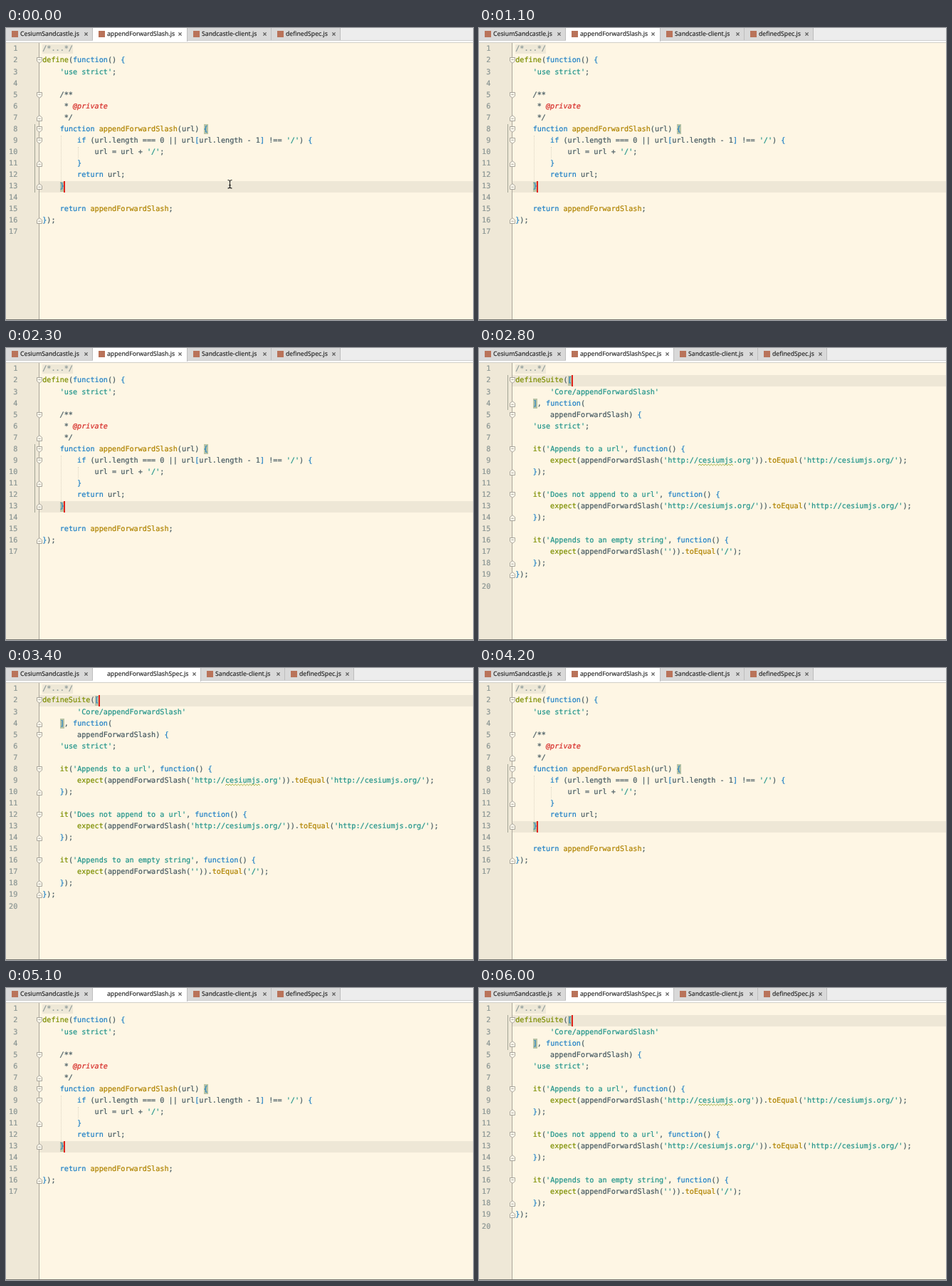
An HTML page for the animation above (6600 ms loop, 656 by 410 pixels).

```html
<!DOCTYPE html>
<html lang="en">
<head>
<meta charset="utf-8">
<title>Switching between code and spec</title>
<style>
  html, body { margin: 0; width: 100%; height: 100%; overflow: hidden; }
  body { background: #fef6e4; text-rendering: geometricPrecision; }
  #stage { position: relative; width: 656px; height: 410px; overflow: hidden; }
  #stage div, #stage i, #stage svg { position: absolute; }
  .view { inset: 0; background: #fef6e4; }

  .bar { left: 0; top: 0; width: 656px; height: 17px; background: #ededed; border-bottom: 1px solid #cfcfcf; }
  .strip { left: 0; top: 18px; width: 656px; height: 2px; background: #fdfdfd; border-bottom: 1px solid #d3d0c8; }
  .tab { top: 0; height: 17px; box-sizing: border-box; border-right: 1px solid #bdbdbd; background: #d9d9d9;
         font: 8.7px/17px "Noto Sans", "Open Sans", sans-serif; color: #1c1c1c; white-space: pre;
         -webkit-text-stroke: .12px; }
  .tab.on { background: #fff; height: 19px; }
  .tab span { position: absolute; left: 20px; top: 0; }
  .icon { left: 8px; top: 4px; width: 9px; height: 9px; background: #b9735a; }
  .tab svg { top: 6px; width: 5px; height: 5px; stroke: #555; stroke-width: 1.2; }

  .gutter { left: 0; top: 21px; width: 46px; height: 389px; background: #efe8d7; border-right: 1px solid #aaa69b; }
  .current { left: 47px; width: 609px; height: 16px; background: #eee7d6; }
  .row, .num { height: 16.06px; font: 10.16px/16.06px "DejaVu Sans Mono", monospace; white-space: pre;
               -webkit-text-stroke: .22px; }
  .row { left: 51.2px; color: #485c63; }
  .num { left: 0; width: 16.3px; text-align: right; color: #8b9694; }
  .match { width: 6.1px; height: 14px; background: #b9c4a6; }
  .fold { left: 51px; width: 43px; height: 13px; background: #eee8d7; }
  .caret { width: 1.8px; height: 16px; background: #e0241c; }
  .scope { left: 40px; width: 1px; background: #a3a496; }
  .guide { width: 0; border-left: 1px dotted #ddd6c4; }
  .mark { left: 43px; width: 8px; height: 9px; fill: #fdf8ec; stroke: #a09e95; stroke-width: .9; }
  .wave { fill: none; stroke: #9aa82c; stroke-width: .9; }
  .base { left: 0; top: 409px; width: 656px; height: 1px; background: #77756f; }

  .kw, .br { color: #1f80c6; }
  .str { color: #22958b; }
  .call { color: #7d8f00; }
  .name { color: #b08400; }
  .tag { color: #d62c28; font-style: italic; }
  .doc { font-style: italic; }
  .dim { color: #8d9a99; }
</style>
</head>
<body>
<div id="stage"></div>
<script>
const LOOP = 6600, ROW = 16.06, CHAR = 6.117, LEFT = 51.2;
const stage = document.getElementById('stage');
const rowTop = n => 22.4 + ROW * (n - 1);
const colX = c => LEFT + CHAR * c;

const files = [
  {
    tab: 'appendForwardSlash.js', tabEnd: 255, closeX: 242,
    code: `/*...*/
define(function() {
    'use strict';

    /**
     * @private
     */
    function appendForwardSlash(url) {
        if (url.length === 0 || url[url.length - 1] !== '/') {
            url = url + '/';
        }
        return url;
    }

    return appendForwardSlash;
});
`,
    names: 'appendForwardSlash',
    open: [2, 5, 8, 9], close: [7, 11, 13, 16],
    current: 13, caret: 5, match: [[8, 37], [13, 4]], scope: [8, 13],
    guides: [[4, 9, 12], [8, 10, 10]],
    shown: [[0, LOOP]],
    icon: [[0, 1900], [2000, 2900], [3000, 3900], [4000, 5100], [5200, LOOP]],
    scoped: [[0, 1900], [2200, 2900], [3100, 3900], [4200, 5100], [5500, LOOP]]
  },
  {
    tab: 'appendForwardSlashSpec.js', tabEnd: 274, closeX: 261.5,
    code: `/*...*/
defineSuite([
        'Core/appendForwardSlash'
    ], function(
        appendForwardSlash) {
    'use strict';

    it('Appends to a url', function() {
        expect(appendForwardSlash('http://cesiumjs.org')).toEqual('http://cesiumjs.org/');
    });

    it('Does not append to a url', function() {
        expect(appendForwardSlash('http://cesiumjs.org/')).toEqual('http://cesiumjs.org/');
    });

    it('Appends to an empty string', function() {
        expect(appendForwardSlash('')).toEqual('/');
    });
});
`,
    names: 'toEqual',
    open: [2, 5, 8, 12, 16], close: [4, 10, 14, 18, 19],
    current: 2, caret: 13, match: [[2, 12], [4, 4]], scope: [2, 4],
    guides: [], wave: [9, 42, 8],
    shown: [[1200, 1900], [2500, 2900], [3400, 3900], [4400, 5100], [5600, LOOP]],
    icon: [[1300, 2500], [2600, 3400], [3600, 4400], [4500, 5600], [5700, LOOP]],
    scoped: [[1700, 1900], [2800, 2900], [3700, 3900], [4800, 5100], [6000, LOOP]]
  }
];

function add(parent, cls, box = {}, html = '') {
  const el = document.createElement('div');
  el.className = cls;
  for (const key in box) el.style[key] = box[key] + 'px';
  el.innerHTML = html;
  parent.append(el);
  return el;
}

// Hard on/off visibility over the loop, spans in ms.
function during(el, spans) {
  const frames = [];
  const key = (t, opacity) => frames.push({ offset: t / LOOP, opacity, easing: 'step-end' });
  if (spans[0][0] > 0) key(0, 0);
  for (const [from, to] of spans) {
    key(from, 1);
    key(to, to < LOOP ? 0 : 1);
  }
  const run = el.animate(frames, { duration: LOOP, iterations: Infinity });
  run.startTime = 0;
}

function paint(line, names) {
  if (line.startsWith('/*.')) return `<span class="dim">${line}</span>`;
  if (/^\s*\/?\*/.test(line))
    return `<span class="doc">${line.replace(/@\w+/, '<span class="tag">$&</span>')}</span>`;
  const rules = [
    ['str', "'[^']*'"],
    ['kw', '\\b(?:function|return|if)\\b'],
    ['call', '\\b(?:defineSuite|define|it|expect)\\b'],
    ['name', `\\b${names}\\b`],
    ['br', '[{}\\[\\]]']
  ];
  const all = new RegExp(rules.map(r => `(${r[1]})`).join('|'), 'g');
  return line.replace(all, (word, ...groups) =>
    `<span class="${rules[groups.findIndex(g => g === word)][0]}">${word}</span>`);
}

function tab(view, label, left, right, closeX, on) {
  const el = add(view, on ? 'tab on' : 'tab', { left, width: right - left },
    `<i class="icon"></i><span>${label}</span>` +
    `<svg viewBox="0 0 5 5" style="left:${closeX - left}px"><path d="M.4 .4 4.6 4.6M4.6 .4.4 4.6"/></svg>`);
  return el.querySelector('.icon');
}

function foldMark(view, row, up) {
  const path = up ? 'M.5 8.5V3.5L4 .7 7.5 3.5V8.5Z' : 'M.5 .5V5.5L4 8.3 7.5 5.5V.5Z';
  const y = up ? 5.3 : 3.4;
  view.insertAdjacentHTML('beforeend',
    `<svg class="mark" viewBox="0 0 8 9" style="top:${rowTop(row) + 3}px"><path d="${path}M2.3 ${y}H5.7"/></svg>`);
}

function wavyLine(view, [row, col, count]) {
  const points = Array.from({ length: count * 3 + 1 }, (_, i) => `${i * CHAR / 3},${i % 2 ? 1 : 3}`);
  view.insertAdjacentHTML('beforeend',
    `<svg class="wave" width="52" height="4" style="left:${colX(col)}px;top:${rowTop(row) + 11.5}px">` +
    `<polyline points="${points.join(' ')}"/></svg>`);
}

function build(file) {
  const view = add(stage, 'view');
  add(view, 'bar');
  add(view, 'strip');
  const shift = file.tabEnd - 255;
  tab(view, 'CesiumSandcastle.js', 0, 122, 109.5);
  const icon = tab(view, file.tab, 122, file.tabEnd, file.closeX, true);
  tab(view, 'Sandcastle-client.js', 255 + shift, 373 + shift, 360.5 + shift);
  tab(view, 'definedSpec.js', 373 + shift, 470 + shift, 457.5 + shift);

  add(view, 'gutter');
  add(view, 'current', { top: rowTop(file.current) - .5 });
  add(view, 'fold', { top: rowTop(1) + 1 });
  for (const [col, from, to] of file.guides)
    add(view, 'guide', { left: Math.round(colX(col)) + 1, top: rowTop(from), height: ROW * (to - from + 1) });
  for (const [row, col] of file.match)
    add(view, 'match', { left: colX(col), top: rowTop(row) + .5 });

  file.code.split('\n').forEach((line, i) => {
    const top = rowTop(i + 1);
    add(view, 'num', { top }, i + 1);
    add(view, 'row', { top }, paint(line, file.names));
  });
  if (file.wave) wavyLine(view, file.wave);
  add(view, 'caret', { left: colX(file.caret) - .9, top: rowTop(file.current) - .5 });
  file.open.forEach(row => foldMark(view, row, false));
  file.close.forEach(row => foldMark(view, row, true));

  const [first, last] = file.scope;
  const scope = add(view, 'scope', { top: rowTop(first), height: ROW * (last - first + 1) });
  add(view, 'base');

  during(view, file.shown);
  during(icon, file.icon);
  during(scope, file.scoped);
  return view;
}

const [codeView] = files.map(build);

// Text pointer, hidden by the first key press.
const pointer = add(codeView, 'pointer', { left: 309, top: 212 },
  `<svg width="11" height="15" fill="none" stroke="#222" stroke-width="1.1">
     <path d="M2.5 1.5Q5.5 1.5 5.5 3.5Q5.5 1.5 8.5 1.5M5.5 3.5V11.5M2.5 13Q5.5 13 5.5 11Q5.5 13 8.5 13M4 8.7H7"/>
   </svg>`);
during(pointer, [[0, 1000]]);
</script>
</body>
</html>
```
